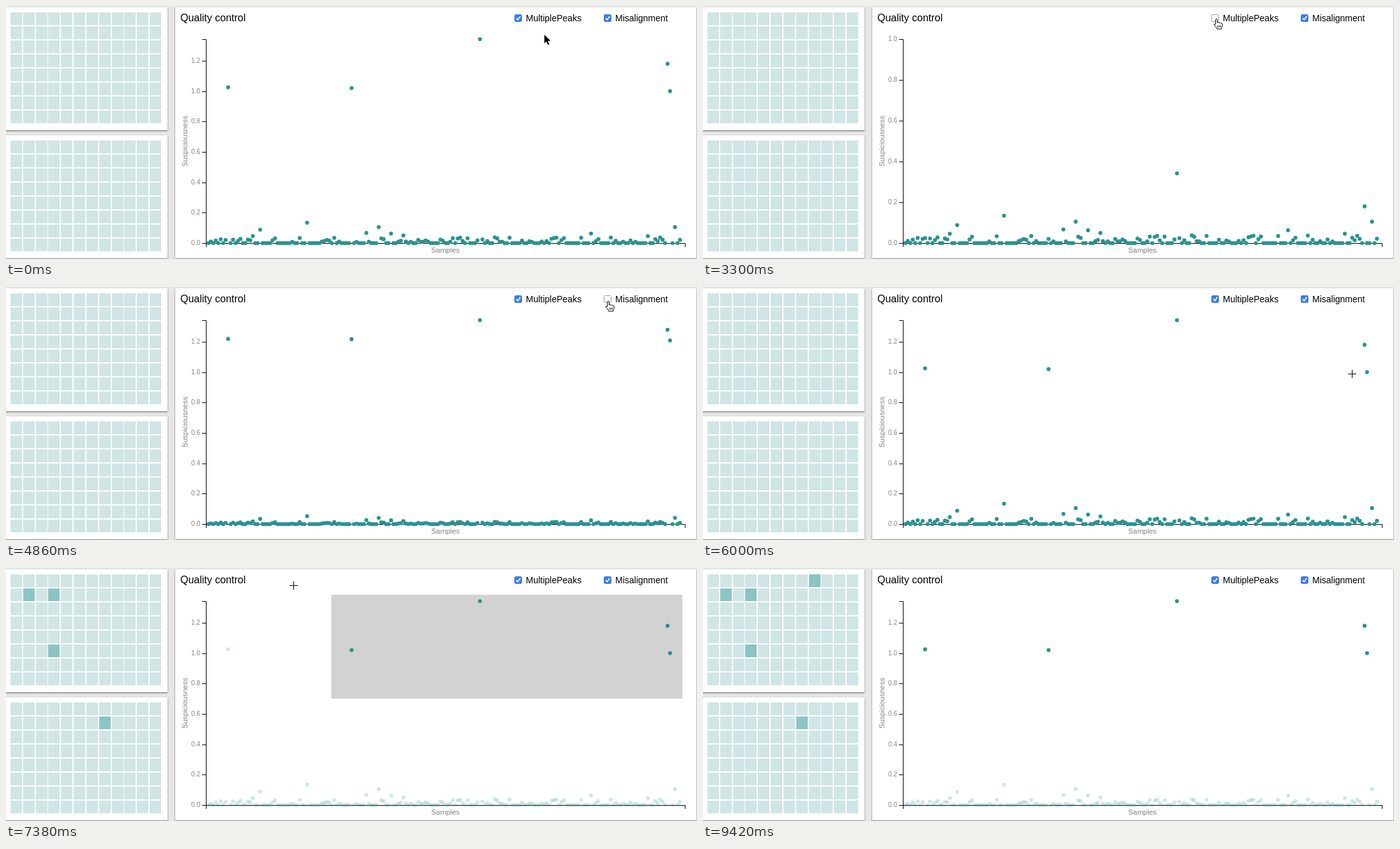
An HTML page with a canvas that plays this animation: 1082x397 px, repeating every 9480 ms.

```html
<!DOCTYPE html>
<html lang="en">
<head>
<meta charset="utf-8">
<title>Quality control</title>
<style>
html, body { margin: 0; width: 100%; height: 100%; overflow: hidden; background: #e6e6e6 }
canvas { display: block }
</style>
</head>
<body>
<canvas width="1082" height="397"></canvas>
<script>
const ctx = document.querySelector('canvas').getContext('2d');
const LOOP = 9480, STEP = 60, COUNT = 192, BASE = 372, TOP = 52, HEIGHT = BASE - TOP;
const FONT = '"Liberation Sans", Arial, sans-serif', TEAL = '#2a9392', GREY = '#828282';

let seed = 7;
const random = () => (seed = seed * 16807 % 2147483647) / 2147483647;

// Misalignment: mostly zero with low noise, plus a few outliers
const outliers = {
  8: .025, 18: .046, 21: .088, 40: .134, 58: .02, 64: .067, 69: .105, 74: .063,
  79: .05, 110: .342, 155: .063, 178: .046, 186: .18, 187: 0, 189: .105
};
const misaligned = Array.from({ length: COUNT }, (_, i) => {
  const noise = random() < .6 ? 0 : .008 + .03 * random() ** 2;
  return outliers[i] ?? noise;
});

// Samples with multiple peaks -> [plate, row, column]
const peaks = { 8: [0, 0, 8], 58: [0, 5, 3], 110: [1, 1, 7], 186: [0, 1, 1], 187: [0, 1, 3] };

// Checkbox states
const states = [
  { time: -1000, multi: true, mis: true },
  { time: 2580, multi: false, mis: true },
  { time: 3540, multi: true, mis: true },
  { time: 4590, multi: true, mis: false },
  { time: 5400, multi: true, mis: true }
];
const TRANSITION = 500;

// Pointer moves: [start, duration, x, y]
const moves = [
  [900, 600, 806, 21], [2280, 220, 804, 20], [3700, 500, 943, 22],
  [5500, 800, 1059, 205], [6700, 260, 838, 62], [6960, 60, 808, 54],
  [7020, 480, 330, 18], [8100, 280, 420, 200], [8560, 440, 470, 400]
];
const DRAG = 6700, RELEASE = 7560, CLEAR = 8500;

const clamp = p => Math.min(1, Math.max(0, p));
const ease = p => p < .5 ? 4 * p ** 3 : 1 - 4 * (1 - p) ** 3;
const sampleX = i => 313 + 750 / 194 * (i + 1);

function pointer(t) {
  let x = 843, y = 45;
  for (const [start, duration, toX, toY] of moves) {
    const p = clamp((t - start) / duration);
    x += (toX - x) * p;
    y += (toY - y) * p;
  }
  return [x, y];
}

const value = ({ multi, mis }, i) => (multi && i in peaks ? 1 : 0) + (mis ? misaligned[i] : 0);
const domain = ({ multi, mis }) => multi && mis ? 1.342 : 1;
const sampleHeight = (state, i) => value(state, i) / domain(state) * HEIGHT;

function rect(color, x, y, w, h) {
  ctx.fillStyle = color;
  ctx.fillRect(x, y, w, h);
}

function text(str, x, y, size, color, align = 'left', baseline = 'alphabetic') {
  ctx.font = `${size}px ${FONT}`;
  ctx.fillStyle = color;
  ctx.textAlign = align;
  ctx.textBaseline = baseline;
  ctx.fillText(str, x, y);
}

function panel(x, y, w, h) {
  ctx.save();
  ctx.shadowColor = 'rgba(0,0,0,.6)';
  ctx.shadowBlur = 2;
  ctx.shadowOffsetY = 1;
  rect('#fff', x, y, w, h);
  ctx.restore();
}

function plate(index, y, selected) {
  panel(-4, y, 257, 193);
  for (let row = 0; row < 8; row++) for (let col = 0; col < 12; col++) {
    const on = selected.some(([p, r, c]) => p === index && r === row && c === col);
    rect(on ? '#8bc4c3' : '#d0e5e5', Math.round(7 + col * 19.83), y + 8 + row * 22, 18, 20);
  }
}

function checkbox(x, label, on) {
  ctx.beginPath();
  ctx.roundRect(x + .5, 13.5, 11, 11, 2);
  ctx.fillStyle = on ? '#3b7ded' : '#fff';
  ctx.strokeStyle = on ? '#3b7ded' : '#999';
  ctx.lineWidth = 1;
  ctx.fill();
  ctx.stroke();
  if (on) {
    ctx.strokeStyle = '#fff';
    ctx.lineWidth = 1.7;
    ctx.stroke(new Path2D(`M${x + 3} 19.2l2.3 2.5 4-5.8`));
  }
  text(label, x + 18, 24, 14, '#000');
}

function axes(max) {
  ctx.strokeStyle = '#000';
  ctx.lineWidth = 1;
  ctx.stroke(new Path2D('M307 52.5H313.5V372.5H307M313.5 378V372.5H1063.5V378'));
  for (let k = 0; k / 5 <= max; k++) {
    const y = Math.round(BASE - k / 5 / max * HEIGHT);
    rect('#000', 307, y, 6, 1);
    text((k / 5).toFixed(1), 304, y + .5, 10, GREY, 'right', 'middle');
  }
  text('Samples', 688, 387, 11.5, GREY, 'center');
  ctx.save();
  ctx.translate(283.5, 212);
  ctx.rotate(-Math.PI / 2);
  text('Suspiciousness', 0, 0, 11.5, GREY, 'center');
  ctx.restore();
}

const arrow = new Path2D('M0 0V13.5L3.1 10.7 5.4 16 7.7 15 5.4 9.8H9.6Z');
const hand = new Path2D('M-1.3 1Q0-1 1.4 1V6Q3 4.8 4.1 6.4 5.8 5.4 6.8 7 8.9 6.4 9.2 8.4V11Q9 13 7.8 14.2V16H.6V14.6L-3.6 9.6Q-4.4 7.4-1.3 8.8Z');
const knuckles = new Path2D('M2 10.5V13.5M4.2 10.5V13.5M6.4 10.5V13.5');

function cursor(t) {
  const [x, y] = pointer(t).map(Math.round);
  const dragging = t >= DRAG && t < RELEASE;
  const overPlot = x > 313 && y > 50 && y < BASE;
  ctx.save();
  ctx.translate(x, y);
  ctx.lineWidth = 1;
  if (dragging || overPlot) {
    rect('#000', -6, 0, 13, 1);
    rect('#000', 0, -6, 1, 13);
  } else if (x > 790 && y < 30) {
    ctx.fillStyle = '#fff';
    ctx.strokeStyle = '#000';
    ctx.fill(hand);
    ctx.stroke(hand);
    ctx.stroke(knuckles);
  } else {
    ctx.fillStyle = '#000';
    ctx.strokeStyle = '#fff';
    ctx.stroke(arrow);
    ctx.fill(arrow);
  }
  ctx.restore();
}

function draw(t) {
  const n = states.findLastIndex(s => s.time <= t);
  const now = states[n], before = states[n - 1] || now;
  const p = clamp((t - now.time) / TRANSITION), mix = ease(p);

  // The brush trails the pointer by one step
  const brushed = t >= DRAG;
  const [bx, by] = pointer(Math.min(t, RELEASE) - STEP);
  const left = Math.max(330, bx), top = Math.max(42, by), right = 1059, bottom = 205;

  const dots = misaligned.map((_, i) => {
    const from = sampleHeight(before, i), to = sampleHeight(now, i);
    const x = sampleX(i), y = BASE - from - (to - from) * mix;
    const inside = brushed && x >= left && x <= right && y >= top && y <= bottom;
    return { x, y, inside };
  });
  const selected = Object.keys(peaks).filter(i => dots[i].inside).map(i => peaks[i]);

  rect('#e6e6e6', 0, 0, 1082, 397);
  plate(0, 2, selected);
  plate(1, 203, selected);
  panel(265, 2, 816, 394);
  text('Quality control', 273, 24, 16, '#000');
  checkbox(796, 'MultiplePeaks', now.multi);
  checkbox(936, 'Misalignment', now.mis);
  axes(domain(p < 1 ? before : now));

  if (brushed && t < CLEAR) rect('#d2d2d2', left, top, right - left, bottom - top);
  ctx.fillStyle = TEAL;
  for (const { x, y, inside } of dots) {
    ctx.globalAlpha = brushed && !inside ? .22 : 1;
    ctx.beginPath();
    ctx.arc(x, y, 3.1, 0, 7);
    ctx.fill();
  }
  ctx.globalAlpha = 1;
  cursor(t);
}

const start = performance.now();
function tick() {
  const t = (performance.now() - start) % LOOP;
  draw(t - t % STEP);
  requestAnimationFrame(tick);
}
tick();
</script>
</body>
</html>
```
